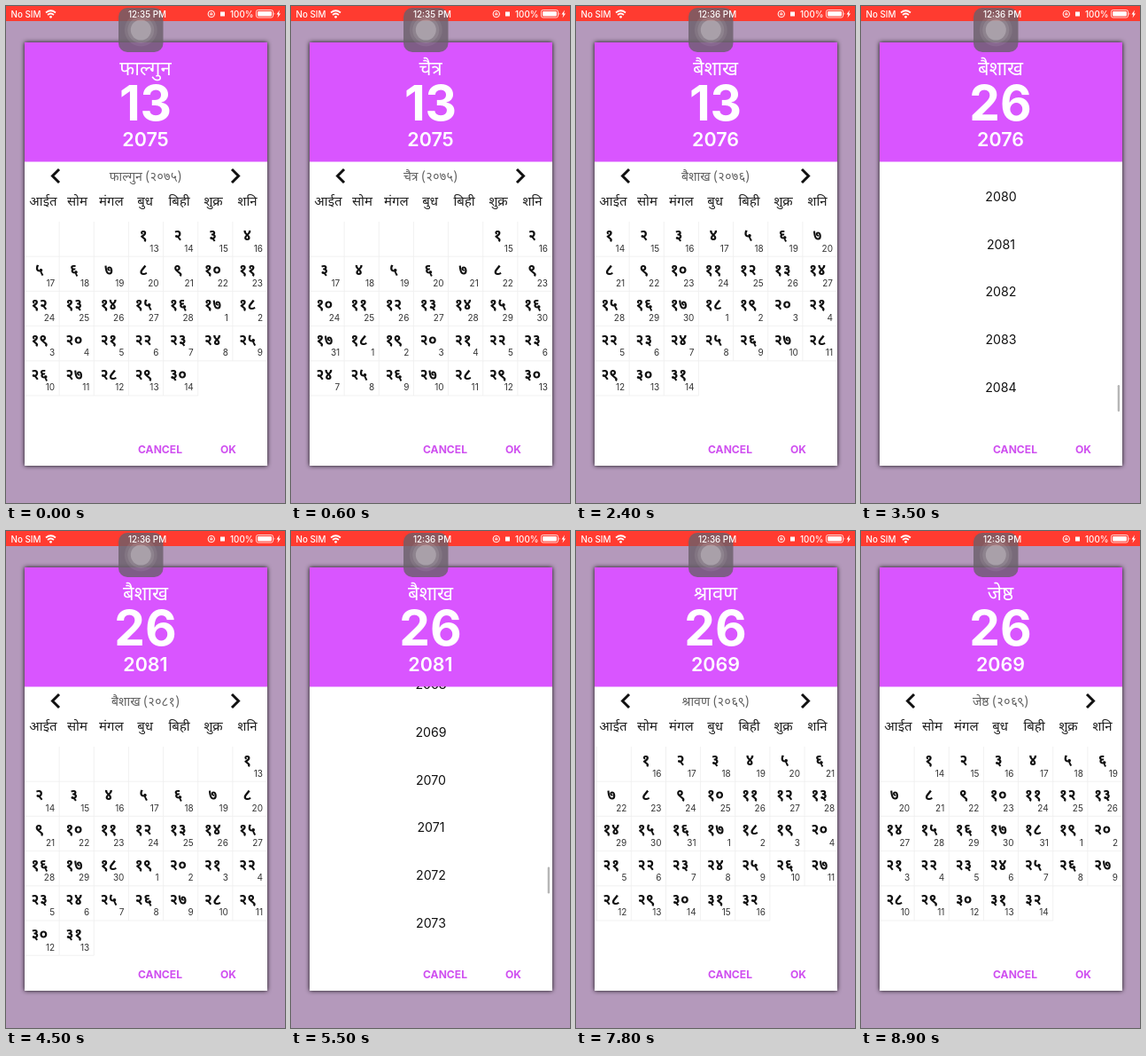
Write an HTML page that moves like this. It is 315 px wide and 560 px high and loops after 9 s.

```html
<!DOCTYPE html>
<html lang="en">
<head>
<meta charset="utf-8">
<title>Date picker</title>
<style>
  html, body { margin: 0; width: 100%; height: 100%; overflow: hidden; background: #b499bb; }
  svg { display: block; width: 315px; height: 560px; }
  text { font-family: Inter, 'Noto Sans Devanagari', 'Noto Sans', sans-serif; }
  .mid { text-anchor: middle; }
  .end { text-anchor: end; }
  .nep { font-family: 'Noto Sans Devanagari', 'Noto Sans', sans-serif; }
  .status { font-size: 9.8px; font-weight: 500; fill: #fff; }
  .week { font-size: 15px; font-weight: 500; fill: #222; }
  .day { font-size: 17px; font-weight: 700; fill: #111; }
  .ad { font-size: 10px; fill: #333; }
  .year { font-size: 14.2px; fill: #111; }
  .action { font-size: 12.1px; font-weight: 700; fill: #cf4ff0; }
  .card { filter: drop-shadow(0 .5px 2.5px rgba(0, 0, 0, .95)); }
</style>
</head>
<body>
<svg viewBox="0 0 315 560">
  <defs>
    <clipPath id="gridClip"><rect x="21" y="240" width="274" height="240"/></clipPath>
    <clipPath id="listClip"><rect x="21" y="175" width="274" height="301"/></clipPath>
  </defs>
  <rect width="315" height="560" fill="#b499bb"/>
  <rect class="card" x="21" y="41" width="274" height="477" fill="#fff"/>
  <rect x="21" y="41" width="274" height="134.5" fill="#d955ff"/>

  <g fill="#fff">
    <text id="month" class="mid nep" x="157.5" y="78" font-size="22" font-weight="500"/>
    <text id="date" class="mid" x="157.5" y="128.5" font-size="55" font-weight="700"/>
    <text id="bsYear" class="mid" x="157.5" y="158" font-size="21.5" font-weight="600"/>
  </g>

  <g id="calendar">
    <g fill="none" stroke="#111" stroke-width="3">
      <path d="M60 184l-7.5 7.5 7.5 7.5"/>
      <path d="M255 184l7.5 7.5-7.5 7.5"/>
    </g>
    <text id="title" class="mid nep" x="157.5" y="196.5" font-size="14" fill="#606060"/>
    <g id="week"></g>
    <g clip-path="url(#gridClip)"><g id="pages"></g></g>
  </g>

  <g id="list">
    <g id="years" clip-path="url(#listClip)"></g>
    <rect id="bar" x="289.7" width="2.4" height="30" rx="1.2" fill="#b5b5b5"/>
  </g>

  <text class="action" x="149" y="503.7">CANCEL</text>
  <text class="action" x="242" y="503.7">OK</text>

  <rect width="315" height="17" fill="#ff3b30"/>
  <text class="status" x="5.5" y="12.7">No SIM</text>
  <g fill="none" stroke="#fff" stroke-width="1.7">
    <path d="M45 7.5q5.500-4.500 11 0M47 10q3.500-3 7 0"/>
    <circle cx="231.8" cy="9" r="3.7" stroke-width="1"/>
    <path d="M230.3 9.8h3M230.8 9.500v-1.200q1-1.500 2 0v1.200" stroke-width="1"/>
  </g>
  <circle cx="50.5" cy="12.3" r="1.4" fill="#fff"/>
  <rect x="242" y="6.5" width="5" height="5" fill="#fff"/>
  <text class="status" x="253" y="12.7">100%</text>
  <rect x="282.5" y="4.5" width="19" height="8.5" rx="2" fill="none" stroke="#fff" stroke-width=".8"/>
  <rect x="284" y="6" width="16" height="5.5" rx="1" fill="#fff"/>
  <path d="M302.7 7.3q1.500 1.500 0 3zM309 4.500l-3.500 5h2l-1 4 3.500-5h-2z" fill="#fff"/>

  <rect x="127" y="2" width="50.5" height="50" rx="10" fill="#6a606a" fill-opacity=".8"/>
  <g fill="#fff">
    <circle cx="152.3" cy="27" r="18.5" fill-opacity=".07"/>
    <circle cx="152.3" cy="27" r="15" fill-opacity=".1"/>
    <circle cx="152.3" cy="27" r="11.5" fill-opacity=".24"/>
  </g>
  <text id="clock" class="status mid" x="159.5" y="12.7"/>
</svg>

<script>
const LOOP = 9000, STEP = 100;
const LEFT = 21, WIDTH = 274, TOP = 243, COL = WIDTH / 7, ROW = 39.2;
const $ = id => document.getElementById(id);

// name, year, length in days, first day in the Gregorian calendar
const MONTHS = [
  ['फाल्गुन', 2075, 30, '2019-02-13'],
  ['चैत्र', 2075, 30, '2019-03-15'],
  ['बैशाख', 2076, 31, '2019-04-14'],
  ['बैशाख', 2081, 31, '2024-04-13'],
  ['बैशाख', 2069, 31, '2012-04-13'],
  ['जेष्ठ', 2069, 32, '2012-05-14'],
  ['आषाढ', 2069, 31, '2012-06-15'],
  ['श्रावण', 2069, 32, '2012-07-16']
];

// start, end, from, to
const PAGE_MOVES = [
  [300, 600, 0, 1], [800, 1200, 1, 2],
  [3900, 3900, 3, 3], [6000, 6000, 4, 4],
  [6300, 6700, 4, 5], [7000, 7300, 5, 6], [7400, 7900, 6, 7],
  [8100, 8400, 7, 6], [8500, 8800, 6, 5]
];
const LIST_MOVES = [
  [1600, 2100, 2076, 2077],
  [3000, 3500, 2076, 2082],
  [4900, 4900, 2081, 2081], [5000, 5700, 2081, 2070.53]
];
const LIST_OPEN = [[1500, 2300], [3000, 3900], [4900, 6000]];
const YEAR_PRESS = [[1300, 1500], [2900, 3000], [4800, 4900]];

const nepali = n => String(n).replace(/\d/g, d => String.fromCharCode(0x966 + +d));
const within = (spans, t) => spans.some(([a, b]) => t >= a && t < b);

function track(moves, t) {
  let value = moves[0][2];
  for (const [start, end, from, to] of moves) {
    if (t < start) break;
    const u = end > start ? Math.min(1, (t - start) / (end - start)) : 1;
    value = to + (from - to) * (1 - u) ** 3;
  }
  return value;
}

function add(parent, tag, attrs, text = '') {
  const el = document.createElementNS('http://www.w3.org/2000/svg', tag);
  for (const key in attrs) el.setAttribute(key, attrs[key]);
  el.textContent = text;
  return parent.appendChild(el);
}

function buildPage([, , length, first]) {
  const page = add($('pages'), 'g', {});
  const start = new Date(first + 'T00:00:00Z');
  const offset = start.getUTCDay();
  let lines = '';
  for (let i = 0; i < offset + length; i++) {
    const x = LEFT + (i % 7) * COL, y = TOP + Math.floor(i / 7) * ROW;
    lines += `M${x + COL} ${y}v${ROW}h${-COL}`;
    const n = i - offset;
    if (n < 0) continue;
    const ad = new Date(+start + n * 864e5).getUTCDate();
    add(page, 'text', { class: 'day nep mid', x: x + COL / 2 - 3, y: y + 21 }, nepali(n + 1));
    add(page, 'text', { class: 'ad end', x: x + COL - 5, y: y + 33.5 }, ad);
  }
  add(page, 'path', { d: lines, fill: 'none', stroke: '#eee', 'stroke-width': .8 });
  return page;
}

['आईत', 'सोम', 'मंगल', 'बुध', 'बिही', 'शुक्र', 'शनि'].forEach((name, i) =>
  add($('week'), 'text', { class: 'week nep mid', x: 42 + i * 38.4, y: 225 }, name));

const pages = MONTHS.map(buildPage);
const rows = Array.from({ length: 9 }, () => add($('years'), 'text', { class: 'year mid', x: 158 }));

function show(el, on) { el.style.display = on ? '' : 'none'; }

function drawList(t) {
  const centre = track(LIST_MOVES, t);
  rows.forEach((row, i) => {
    const year = Math.round(centre) + i - 4;
    row.textContent = year;
    row.setAttribute('y', 327.2 + (year - centre) * 53.7);
  });
  $('bar').setAttribute('y', 427 + (centre - 2082) * 4.32);
}

function drawCalendar(pos) {
  pages.forEach((page, i) => {
    const shift = (i - pos) * WIDTH;
    show(page, Math.abs(shift) < WIDTH);
    page.setAttribute('transform', `translate(${shift} 0)`);
  });
}

function draw(t) {
  const pos = track(PAGE_MOVES, t);
  const [name, year] = MONTHS[Math.round(pos)];
  const open = within(LIST_OPEN, t);
  $('month').textContent = name;
  $('date').textContent = t < 2500 ? 13 : 26;
  $('bsYear').textContent = year;
  $('bsYear').setAttribute('opacity', within(YEAR_PRESS, t) ? .65 : 1);
  $('title').textContent = `${name} (${nepali(year)})`;
  $('clock').textContent = t < 2200 ? '12:35 PM' : '12:36 PM';
  show($('list'), open);
  show($('calendar'), !open);
  if (open) drawList(t);
  else drawCalendar(pos);
}

const begin = performance.now();
function tick() {
  const t = (performance.now() - begin) % LOOP;
  draw(Math.floor(t / STEP) * STEP);
  requestAnimationFrame(tick);
}
tick();
</script>
</body>
</html>
```
